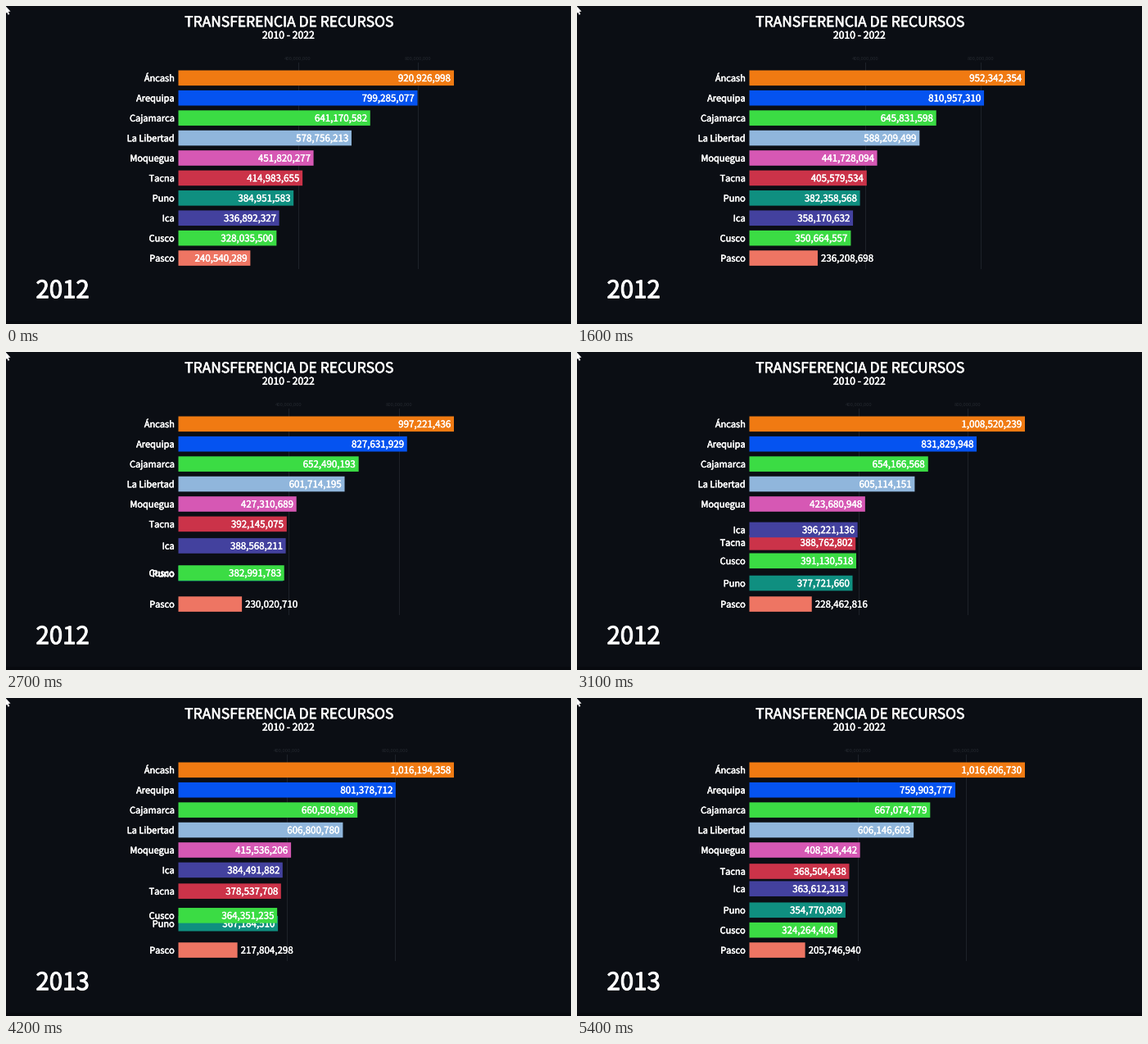
Animation of 690x388 px, one loop 5500 ms. Source, as a matplotlib script:

```python
import matplotlib.pyplot as plt
import numpy as np
from matplotlib.animation import FuncAnimation
from matplotlib.patches import Polygon, Rectangle
from matplotlib.patheffects import withStroke

WIDTH, HEIGHT, DPI = 690, 388, 100
FRAMES, INTERVAL = 55, 100
FONT = "Noto Sans CJK JP"
BACKGROUND = "#0b0e14"
LEFT, BAR_SPAN = 210.5, 336.5
TOP, PITCH, BAR_HEIGHT = 87.8, 24.42, 18.6

# name, colour, value at 2012, at 2013 and at the end of the loop
REGIONS = [
    ("Áncash", "#f07a12", 920926998, 1015864461, 1016606730),
    ("Arequipa", "#0553f0", 799285077, 834558660, 759903777),
    ("Cajamarca", "#3bdc44", 641170582, 655256211, 667074779),
    ("La Libertad", "#90b6dc", 578756213, 607324122, 606146603),
    ("Moquegua", "#d658b4", 451820277, 421321617, 408304442),
    ("Tacna", "#cb3349", 414983655, 386564324, 368504438),
    ("Puno", "#0f8f80", 384951583, 377115470, 354770809),
    ("Ica", "#43419e", 336892327, 401195538, 363612313),
    ("Cusco", "#3bdc44", 328035500, 396420696, 324264408),
    ("Pasco", "#ee7563", 240540289, 227450185, 205746940),
]
KEY_VALUES = np.array([region[2:] for region in REGIONS], float)

# Playback runs unevenly: frame number -> progress (1 = start of 2013)
PACE_FRAMES = [0, 6, 9, 16, 18, 19, 27, 33.6, 35, 42, 48, 54]
PACE = [0, 0.142, 0.142, 0.33090579, 0.42545, 0.42545, 0.80362836,
        1, 1 + 5 / 72, 1 + 32 / 72, 1 + 53 / 72, 2]


def values_at(progress):
    return np.array([np.interp(progress, [0, 1, 2], row) for row in KEY_VALUES])


def clock(progress):
    return np.interp(progress, [0, 1, 2], [0, 84.6, 135.7])


def settle(age, slow=4.1, fast=1.3):
    """Share of a rank change completed after the given time."""
    age = np.maximum(age, 0)
    rest = (slow * np.exp(-age / slow) - fast * np.exp(-age / fast)) / (slow - fast)
    return 1 - rest


HISTORY = np.linspace(0, 2, 2001)
RANKS = np.argsort(np.argsort(-values_at(HISTORY), axis=0), axis=0)
RANK_STEPS = np.diff(RANKS, axis=1)


def positions_at(progress):
    ages = clock(progress) - clock(HISTORY[1:])
    return RANKS[:, 0] + RANK_STEPS @ settle(ages)


fig = plt.figure(figsize=(WIDTH / DPI, HEIGHT / DPI), dpi=DPI, facecolor=BACKGROUND)
ax = fig.add_axes([0, 0, 1, 1])
ax.set_xlim(0, WIDTH)
ax.set_ylim(HEIGHT, 0)
ax.axis("off")


def write(x, y, text, size, color="white", ha="left", bold=0.0, **style):
    """Text sized in pixels; bold is the width of an outline that thickens it."""
    effects = [withStroke(linewidth=bold * 72 / DPI, foreground=color)] if bold else None
    return ax.text(x, y, text, fontsize=size * 72 / DPI, color=color, ha=ha,
                   va="baseline", family=FONT, path_effects=effects, **style)


ax.add_patch(Rectangle((0, 384), WIDTH, 4, color="#080a0f", lw=0))
ax.add_patch(Polygon([(0, 0.6), (5.5, 6.6), (2.8, 7), (4.3, 10), (2.6, 10.8),
                      (1.2, 7.8), (0, 8.8)], color="white", lw=0))
write(345.5, 25.2, "TRANSFERENCIA DE RECURSOS", 17.4, ha="center", bold=0.6)
write(345, 39.8, "2010 - 2022", 12.2, ha="center", bold=0.5)
year = write(36.5, 356.2, "", 29.4, bold=1.0)

ticks = []
for amount in (400_000_000, 800_000_000):
    line, = ax.plot([0, 0], [69, 320], color="#1e2229", lw=0.72, zorder=1)
    label = write(0, 66, f"{amount:,}", 6, "#23272e", "center")
    ticks.append((amount, line, label))

bars = []
for order, (name, color, *_) in enumerate(REGIONS):
    z = 2 + order
    bar = ax.add_patch(Rectangle((LEFT, 0), 0, BAR_HEIGHT, color=color, lw=0,
                                 snap=False, zorder=z))
    label = write(205.7, 0, name, 11, ha="right", bold=0.45, zorder=z)
    number = write(0, 0, "", 11.55, bold=0.35, zorder=z + 0.5)
    bars.append((bar, label, number))


def update(frame):
    progress = np.interp(frame, PACE_FRAMES, PACE)
    values = values_at(progress)
    scale = BAR_SPAN / values.max()
    year.set_text("2012" if progress < 1 else "2013")
    for amount, line, label in ticks:
        x = LEFT + amount * scale
        line.set_xdata([x, x])
        label.set_x(x)
    for (bar, label, number), value, rank in zip(bars, values, positions_at(progress)):
        y = TOP + PITCH * rank
        width = value * scale
        bar.set_y(y - BAR_HEIGHT / 2)
        bar.set_width(width)
        label.set_y(y + 4.2)
        inside = width > 86
        number.set_text(f"{value:,.0f}")
        number.set_ha("right" if inside else "left")
        number.set_position((LEFT + width + (-3.8 if inside else 4), y + 4.2))
    return []


animation = FuncAnimation(fig, update, frames=FRAMES, interval=INTERVAL,
                          repeat=True, repeat_delay=0, blit=False)
plt.show()
```
